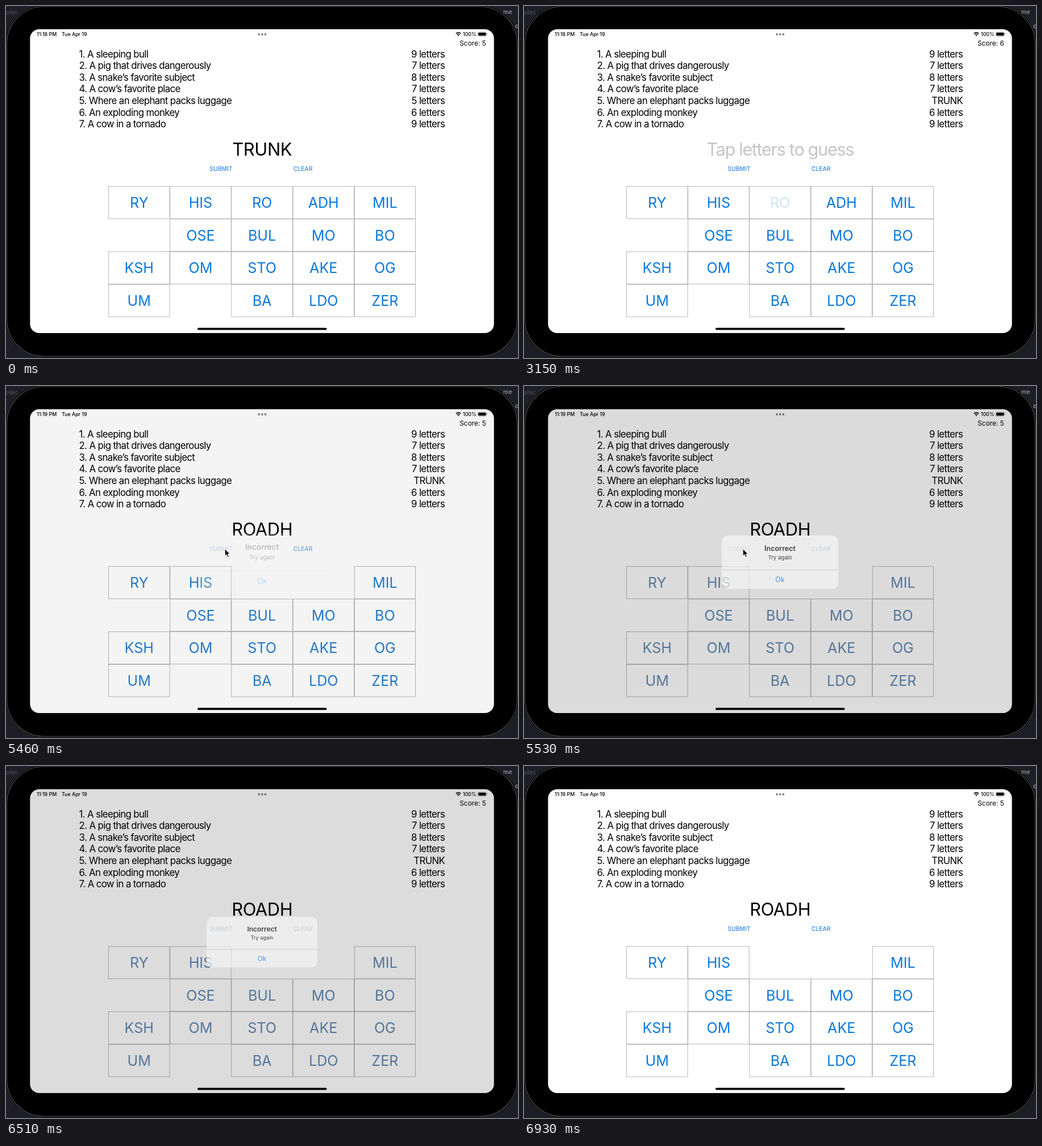
These frames come from a looping animation (901 px wide and 621 px high, 7210 ms). An HTML page:

```html
<!DOCTYPE html>
<html lang="en">
<head>
<meta charset="utf-8">
<title>Word puzzle</title>
<style>
  html, body { margin: 0; width: 100%; height: 100%; overflow: hidden; background: #1d1e26; }
  svg { display: block; width: 901px; height: 621px; }
  text { font-family: Inter, Roboto, "Liberation Sans", sans-serif; font-optical-sizing: none; white-space: pre; }
  .clue { font-size: 16.8px; letter-spacing: -.037em; }
  .guess { font-size: 30.8px; letter-spacing: -.01em; }
  .hint { font-size: 30.8px; letter-spacing: -.045em; fill: #c5c5c7; }
  .tile { font-size: 25.1px; }
  .small { font-size: 10.4px; }
  .label { font-size: 11.9px; }
  .status { font-size: 8.8px; font-weight: 500; }
  .mid { text-anchor: middle; }
  .end { text-anchor: end; }
  .edge { fill: none; stroke: #9c9c9c; stroke-width: .72; }
</style>
</head>
<body>
<svg viewBox="0 0 901 621">
  <rect width="901" height="621" fill="#1d1e26"/>
  <text x="-1" y="15" font-size="10" fill="#505058">ollec</text>
  <text x="875" y="14" font-size="10.5" font-weight="600" fill="#8c8c90">me</text>
  <text x="896" y="39" font-size="10" fill="#d0d0d0">c</text>
  <rect x="-.5" y="-1" width="902" height="620.5" rx="67" fill="#080808"/>
  <rect x="1.5" y="1" width="898" height="617" rx="65" fill="#000" stroke="#4c4c4e" stroke-width="1.2"/>
  <rect x="42.3" y="41" width="816.4" height="536" rx="16" fill="#fff"/>

  <g id="board"></g>

  <g fill="#808084">
    <circle cx="445.2" cy="50" r="1.9"/><circle cx="450.8" cy="50" r="1.9"/><circle cx="456.4" cy="50" r="1.9"/>
  </g>
  <rect id="dim" x="42.3" y="41" width="816.4" height="536" rx="16"/>

  <g class="status">
    <text id="clock" x="54" y="52.7"></text>
    <text x="98" y="52.7">Tue Apr 19</text>
    <text x="804" y="52.7">100%</text>
  </g>
  <g fill="none" stroke="#000" stroke-width="1.4">
    <path d="M791.7 48.6a6.2 6.2 0 0 1 8.8 0M793.3 50.6a3.9 3.9 0 0 1 5.6 0"/>
    <path d="M796.1 53.4l-1.5-1.6a2.1 2.1 0 0 1 3 0z" fill="#000" stroke="none"/>
    <rect x="830" y="45.9" width="15.6" height="7.4" rx="2.2" stroke="#8a8a8a" stroke-width=".7"/>
    <rect x="831.1" y="47" width="13.4" height="5.2" rx="1.3" fill="#000" stroke="none"/>
    <path d="M846.8 48.5v2.2" stroke="#8a8a8a" stroke-width=".9"/>
  </g>
  <rect x="337" y="567.8" width="227.5" height="3.8" rx="1.9"/>

  <g id="alert">
    <rect x="353.2" y="266" width="194.6" height="89.6" rx="10" fill="#f5f5f5"/>
    <path id="pressed" d="M353.2 323.8h194.6v21.8a10 10 0 0 1-10 10h-174.6a10 10 0 0 1-10-10z" fill="#e3e3e4"/>
    <path d="M353.2 323.7h194.6" stroke="#b6b6b8" stroke-width=".72"/>
    <text class="label mid" x="450.5" y="291.9" font-weight="600">Incorrect</text>
    <text class="mid" x="450.5" y="306.3" font-size="9.1">Try again</text>
    <text class="label mid" x="450.5" y="344.2" fill="#007cf0">Ok</text>
  </g>
  <path id="cursor" d="M385.3 287.6v12.2l2.8-2.6 2 4.6 2.1-.9-2-4.5h3.8z" stroke="#fff" stroke-width=".8"/>
</svg>
<script>
const LOOP = 7210, STEP = 70;
const TINT = [10, 120, 223], GRAY = [138, 143, 156];
const clues = ["A sleeping bull", "A pig that drives dangerously", "A snake’s favorite subject",
  "A cow’s favorite place", "Where an elephant packs luggage", "An exploding monkey", "A cow in a tornado"];
const lengths = [9, 7, 8, 7, 5, 6, 9];
const rows = ["RY HIS RO ADH MIL", "- OSE BUL MO BO", "KSH OM STO AKE OG", "UM - BA LDO ZER"];

const el = id => document.getElementById(id);
const text = (cls, x, y, str, id = "") => `<text class="${cls}" x="${x}" y="${y}" id="${id}">${str}</text>`;

function tile(str, col, row) {
  const w = 108.15, h = 57.64, x = 180.2 + col * w, y = 317.9 + row * h;
  return `<g id="${str}"><rect class="edge" x="${x + .36}" y="${y + .36}" width="${w - .72}" height="${h - .72}"/>`
    + text("tile mid", x + w / 2, y + 38.1, str, str + "-label") + "</g>";
}

el("board").innerHTML =
  clues.map((c, i) => text("clue", 128.6, 90.5 + i * 20.64, `${i + 1}. ${c}`)
    + text("clue end", 772.2, 90.5 + i * 20.64, `${lengths[i]} letters`, "answer" + i)).join("")
  + text("label end", 844.8, 70.1, "", "score")
  + text("guess mid", 450.7, 263.7, "", "word")
  + `<g id="tinted">`
  + text("small mid", 378.4, 291.4, "SUBMIT", "submit")
  + text("small mid", 522.6, 291.4, "CLEAR")
  + rows.map((r, j) => r.split(" ").map((s, i) => s === "-" ? "" : tile(s, i, j)).join("")).join("")
  + "</g>";

const within = (t, a, b) => t >= a && t < b;
const show = (id, on) => el(id).setAttribute("visibility", on ? "visible" : "hidden");
const fade = (id, a) => el(id).setAttribute("opacity", a);

// Critically damped spring: 1 at the start, settling to 0.
function spring(t, start) {
  const x = Math.max(0, t - start) * .02285;
  return (1 + x) * Math.exp(-x);
}

// A button dims at once when pressed and eases back after release.
function press(t, down, up) {
  if (t < down) return 1;
  const x = Math.min(1, Math.max(0, (t - up + 50) / 470));
  return t < up ? .2 : .2 + .8 * x * x * (3 - 2 * x);
}

function draw(t) {
  const solved = t >= 1540;
  const word = !solved ? "TRUNK" : t < 3360 ? "" : t < 3920 ? "RO" : "ROADH";
  el("clock").textContent = t < 4620 ? "11:18 PM" : "11:19 PM";
  el("score").textContent = "Score: " + (within(t, 1540, 5390) ? 6 : 5);
  el("answer4").textContent = solved ? "TRUNK" : "5 letters";
  el("word").textContent = word || "Tap letters to guess";
  el("word").setAttribute("class", (word ? "guess" : "hint") + " mid");

  fade("submit", Math.min(press(t, 1260, 1540), press(t, 5250, 5390)));
  fade("RO-label", press(t, 3150, 3360));
  fade("ADH-label", press(t, 3780, 3920));
  show("RO", t < 3360);
  show("ADH", t < 3920);

  const enter = spring(t, 5422);
  const amount = t < 6440 ? 1 - enter : spring(t, 6461);
  const scale = 1 + .18 * enter;
  fade("dim", .2 * amount);
  fade("alert", amount);
  el("alert").setAttribute("transform", `translate(450.5 310.8) scale(${scale}) translate(-450.5 -310.8)`);
  show("pressed", within(t, 6300, 6440));
  el("tinted").setAttribute("fill", `rgb(${TINT.map((c, i) => Math.round(c + (GRAY[i] - c) * amount))})`);
  show("cursor", within(t, 1610, 2240) || within(t, 5460, 5880));
}

function frame() {
  const t = performance.now() % LOOP;
  draw(Math.floor(t / STEP) * STEP);
  requestAnimationFrame(frame);
}
frame();
</script>
</body>
</html>
```
